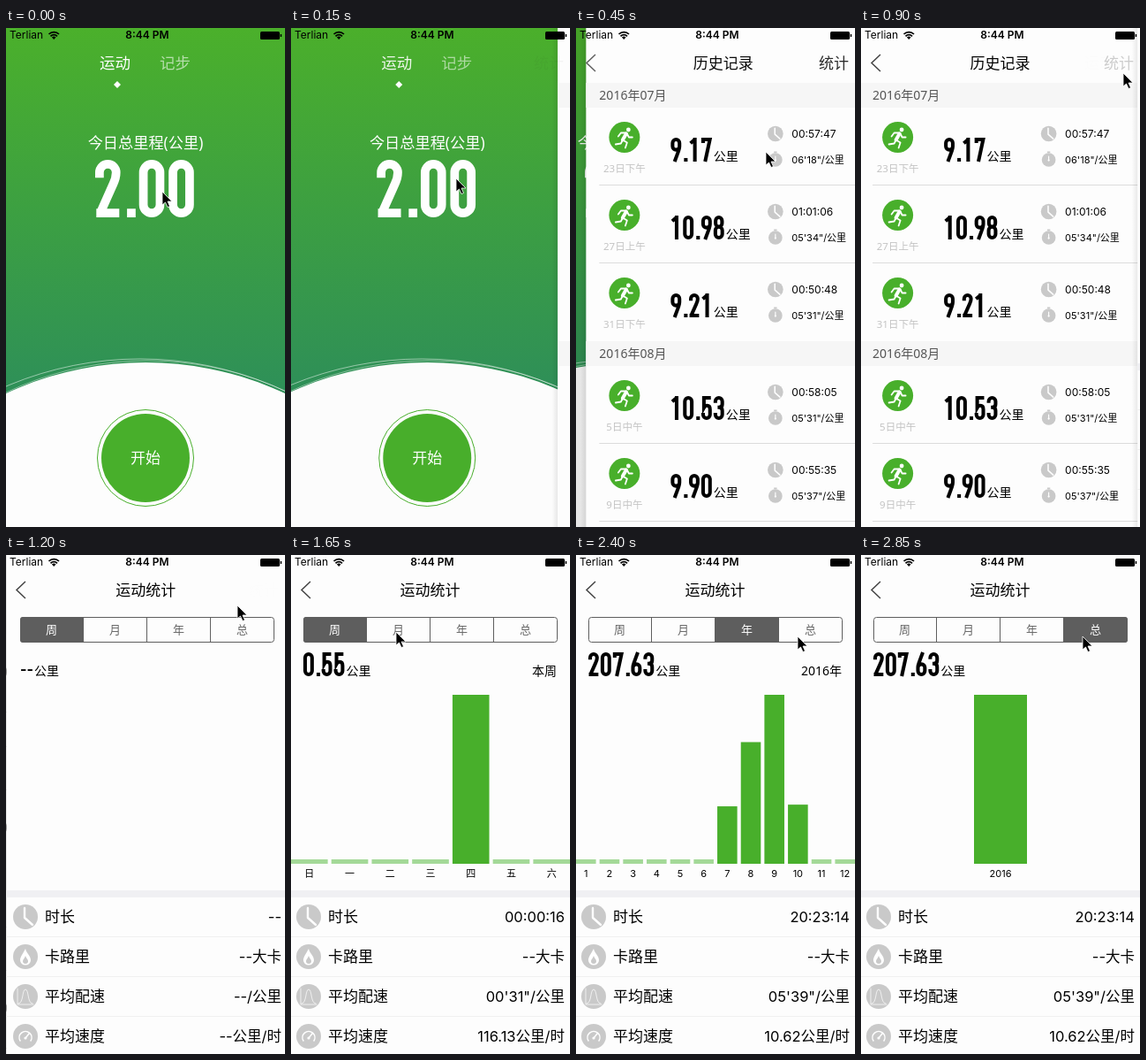
An HTML page for the animation above (3000 ms loop, 316 by 564 pixels).

```html
<!DOCTYPE html>
<html lang="zh-CN">
<head>
<meta charset="utf-8">
<title>运动</title>
<style>
html, body { margin: 0; width: 100%; height: 100%; overflow: hidden; background: #fdfdfd; }
svg { display: block; width: 316px; height: 564px; font-family: Inter, 'Noto Sans CJK SC', 'Noto Sans CJK', sans-serif; }
.cjk { font-family: 'Noto Sans', 'Noto Sans CJK SC', 'Noto Sans CJK', sans-serif; }
</style>
</head>
<body>
<svg id="stage" viewBox="0 0 316 564"></svg>
<script>
const W = 316, H = 564, LOOP = 3000, STEP = 150;
const GREEN = '#48af2b', PALE = '#a4d998', GREY = '#c9c9c9', PAPER = '#fdfdfd';

// Condensed numerals as strokes: 100 units tall, 44 wide
const GLYPHS = {
  0: 'M7.5 22a14.5 14.5 0 0 1 29 0V78a14.5 14.5 0 0 1-29 0Z',
  1: 'M6 23L24 8M24.5 0V100',
  2: 'M7.5 31V22a14.5 14.5 0 0 1 29 0Q36.5 32 31 43L10 90M2 92.5H42',
  3: 'M7.5 29V22a14.5 14.5 0 0 1 29 0V34Q36.5 47 22 47H17M22 47Q36.5 47 36.5 61V78a14.5 14.5 0 0 1-29 0V70',
  5: 'M40 7.5H11V49Q16 40 24 40Q36.5 40 36.5 56V78a14.5 14.5 0 0 1-29 0V70',
  6: 'M28 0L11 46Q7.5 56 7.5 64V78a14.5 14.5 0 0 0 29 0V64a14.5 14.5 0 0 0-29 0',
  7: 'M7.5 22V7.5H36L16 100',
  8: 'M8.5 22a13.5 14.5 0 0 1 27 0V32a13.5 14.5 0 0 1-27 0ZM7.5 62a14.5 14.5 0 0 1 29 0V78a14.5 14.5 0 0 1-29 0Z',
  9: 'M16 100L33 54Q36.5 44 36.5 36V22a14.5 14.5 0 0 0-29 0V36a14.5 14.5 0 0 0 29 0',
  '.': 'M4 92.5H19'
};

const text = (x, y, size, str, attrs = '') => `<text x="${x}" y="${y}" font-size="${size}" ${attrs}>${str}</text>`;
const rect = (x, y, w, h, fill, attrs = '') => `<rect x="${x}" y="${y}" width="${w}" height="${h}" fill="${fill}" ${attrs}/>`;
const circle = (x, y, r, attrs) => `<circle cx="${x}" cy="${y}" r="${r}" ${attrs}/>`;
const line = (d, color, width, attrs = '') => `<path d="${d}" fill="none" stroke="${color}" stroke-width="${width}" ${attrs}/>`;
const group = (x, y, body, scale = 1) => `<g transform="translate(${x} ${y}) scale(${scale})">${body}</g>`;
const MID = 'text-anchor="middle"', END = 'text-anchor="end"', CJK = 'class="cjk"', ROUND = 'stroke-linecap="round" stroke-linejoin="round"';

const advance = c => c === '.' ? 25 : 51.5;
const numeralWidth = (str, height) => [...str].reduce((sum, c) => sum + advance(c), 0) * height / 100;
function numerals(x, y, height, str, color) {
  let pen = 0, body = '';
  for (const c of str) {
    body += `<path transform="translate(${pen})" d="${GLYPHS[c]}"/>`;
    pen += advance(c);
  }
  return `<g role="img" aria-label="${str}" fill="none" stroke="${color}" stroke-width="15" transform="translate(${x} ${y}) scale(${height / 100})">${body}</g>`;
}
const distance = (x, y, str) => numerals(x, y, 27, str, '#000') + text(x + numeralWidth(str, 27), y + 26, 14, '公里');

// Icons, each on a disc of radius 14
const disc = circle(0, 0, 14, `fill="${GREY}"`);
const white = (d, width) => line(d, '#fff', width, ROUND);
const clock = disc + white('M-1-10V1L8 9', 2.4);
const flame = disc + '<path d="M0-9C1-4 6-1 6 4A6 5.5 0 0 1-6 4C-6 0-3-3 0-9Z" fill="#fff"/>' +
  `<path d="M0-1C1 2 3 3 3 5A3 3 0 0 1-3 5C-3 3-1 2 0-1Z" fill="${GREY}"/>`;
const curve = disc + white('M-9-9V9H9M-8 8C-2 8-4-8 0-8S2 8 8 8', .7);
const gauge = disc + white('M-6 5A7 7 0 1 1 6 5M0 2L4-3', 1.5) + circle(0, 2, 1.6, 'fill="#fff"');
const stopwatch = disc + rect(-3, -17, 6, 3, GREY) + white('M0 1V-7', 2) + circle(0, 1, 2, 'fill="#fff"');
const runner = circle(0, 0, 17.5, `fill="${GREEN}"`) + circle(4.5, -8.5, 2.4, 'fill="#fff"') +
  white('M2-4L-2 3', 4) + white('M2-5L-4-5L-7-1M3-4L5 0L9 0M-2 3L3 6L1 12M-2 3L-4 7L-10 8', 1.8);

const home = tabOpacity =>
  rect(0, 0, W, H, 'url(#sky)') +
  `<g opacity="${tabOpacity}">` + text(123.5, 46, 17.5, '运动', MID + ' fill="#fff"') +
  text(191.5, 46, 17.5, '记步', MID + ' fill="#fff" fill-opacity=".6"') + '</g>' +
  '<path d="M126 60l4 4-4 4-4-4Z" fill="#fff"/>' +
  text(158, 136, 17.2, '今日总里程(公里)', MID + ' class="cjk" fill="#fff"') +
  numerals(101, 149, 65, '2.00', '#fff') +
  circle(152, 762, 388, 'fill="none" stroke="#fff" stroke-opacity=".5"') +
  circle(160, 750, 374, 'fill="none" stroke="#fff" stroke-opacity=".4"') +
  circle(158, 752, 374, `fill="${PAPER}"`) +
  circle(158, 486, 54.5, `fill="none" stroke="${GREEN}"`) + circle(158, 486, 50, `fill="${GREEN}"`) +
  text(158, 492, 17, '开始', MID + ' fill="#fff"');

// Sheets reach slightly past their left edge
const sheet = (y, height, fill) => rect(-1.5, y, W + 3, height, fill);

const runs = [
  [90, '23日下午', '9.17', '00:57:47', `06'18"`],
  [178, '27日上午', '10.98', '01:01:06', `05'34"`],
  [266, '31日下午', '9.21', '00:50:48', `05'31"`],
  [382, '5日中午', '10.53', '00:58:05', `05'31"`],
  [470, '9日中午', '9.90', '00:55:35', `05'37"`]
];
const month = (y, name) => sheet(y, 28, '#f6f6f6') + text(13.5, y + 19, 14, name, CJK + ' fill="#555"');
const run = ([y, day, km, time, pace]) =>
  group(42, y + 33.5, runner) +
  text(42, y + 73, 11.5, day, MID + ' class="cjk" fill="#c4c4c4"') +
  distance(94.5, y + 34, km) +
  group(213, y + 29.5, clock, .63) + group(213, y + 59, stopwatch, .56) +
  text(231.5, y + 34, 12, time) + text(231.5, y + 63, 11, pace + '/公里') +
  (y === 266 ? '' : rect(13.5, y + 87, W, 1, '#dcdcdc'));
const history = sheet(0, H, PAPER) + month(62, '2016年07月') + month(354, '2016年08月') + runs.map(run).join('');

const sparse = (count, values) => Array.from({ length: count }, (_, i) => values[i + 1] || 0);
const yearTotals = ['20:23:14', '--大卡', `05'39"/公里`, '10.62公里/时'];
const views = [
  { from: 1300, km: '0.55', period: '本周', bars: sparse(7, { 5: 1 }), label: i => '日一二三四五六'[i],
    totals: ['00:00:16', '--大卡', `00'31"/公里`, '116.13公里/时'] },
  { from: 1740, km: '30.08', period: '2016年10月', bars: sparse(31, { 4: .99, 9: .98, 13: 1, 27: .08 }),
    label: i => i && (i + 1) % 5 ? '·' : i + 1,
    totals: ['03:06:39', '--大卡', `04'51"/公里`, '12.37公里/时'] },
  { from: 2110, km: '207.63', period: '2016年', bars: sparse(12, { 7: .34, 8: .72, 9: 1, 10: .35 }), label: i => i + 1, totals: yearTotals },
  { from: 2600, km: '207.63', period: '', bars: [1], label: () => '2016', totals: yearTotals }
];

function chart({ bars, label, from }, t) {
  const pitch = (W + 4.1) / bars.length, width = Math.min(60, pitch - 4.1);
  const grown = 1 - (1 - Math.min(1, (t - from) / 140)) ** 2;
  return bars.map((value, i) => {
    const mid = i * pitch + (pitch - 4.1) / 2, height = value ? 191 * value * grown : 5;
    return rect(mid - width / 2, 349 - height, width, height, value ? GREEN : PALE) + text(mid, 364, 11, label(i), MID);
  }).join('');
}

function segments(selected, pressed) {
  let body = '';
  [...'周月年总'].forEach((name, i) => {
    const x = 13.5 + i * 72, on = i === selected;
    if (on || i === pressed) body += rect(x, 70, 72.5, 29, '#5e5e5e', `fill-opacity="${on ? 1 : .25}"`);
    if (i) body += line(`M${x} 70V99`, '#5e5e5e', 1);
    body += text(x + 36, 89, 13, name, `${MID} fill="${on ? '#fff' : '#666'}"`);
  });
  return `<g clip-path="url(#pill)">${body}</g>` + rect(14.5, 70.5, 287, 28, 'none', 'rx="3" stroke="#5e5e5e"');
}

function stats(t) {
  const view = views.findLast(v => t >= v.from);
  const totals = view ? view.totals : ['--', '--大卡', '--/公里', '--公里/时'];
  const rows = [['时长', clock], ['卡路里', flame], ['平均配速', curve], ['平均速度', gauge]];
  return sheet(0, H, PAPER) +
    segments(view ? views.indexOf(view) : 0, t >= 2550 ? 3 : -1) +
    (view
      ? distance(14, 110, view.km) + text(301, 136, 14, view.period, END + ' class="cjk"') + chart(view, t)
      : text(14, 135, 16, '--', 'font-weight="700"') + text(30, 136, 14, '公里')) +
    sheet(379, 8, '#f0f0f3') +
    rows.map(([name, icon], i) => {
      const y = 409 + i * 45;
      return group(20, y, icon) + text(42, y + 6, 17, name) + text(310, y + 6, 16.5, totals[i], END) +
        (i < 3 ? sheet(y + 22, 1, '#f0f0f0') : '');
    }).join('');
}

const statusBar =
  text(4, 12, 12, 'Terlian') + text(160, 12, 12, '8:44 PM', MID + ' font-weight="600"') +
  line('M48.5 7A8 8 0 0 1 60 7M50.5 9.3A5.2 5.2 0 0 1 58 9.3', '#000', 1.7) + '<path d="M54.2 13l-2.3-2.4a3.3 3.3 0 0 1 4.6 0Z"/>' +
  rect(288, 4, 22, 9, '#000', 'rx="1.5"') + rect(310.7, 7, 1.5, 3, '#000');

// Critically damped spring from 0 to 1; rate is per millisecond
function spring(t, start, rate) {
  const x = Math.max(0, t - start) * rate;
  return 1 - (1 + x) * Math.exp(-x);
}

const pointerPath = [
  [0, 177, 185], [150, 187, 170], [300, 188, 164], [450, 215, 140], [600, 280, 90], [750, 296, 55], [900, 297, 51],
  [1200, 262, 57], [1350, 218, 70], [1500, 106, 76], [1650, 119, 87], [1800, 135, 90], [1950, 186, 91],
  [2100, 198, 92], [2250, 213, 93], [2400, 251, 92], [LOOP, 251, 92]
];
function pointer(t) {
  const i = pointerPath.findIndex(p => p[0] > t);
  const [t0, x0, y0] = pointerPath[i - 1], [t1, x1, y1] = pointerPath[i], k = (t - t0) / (t1 - t0);
  return group(x0 + (x1 - x0) * k, y0 + (y1 - y0) * k,
    '<path d="M0 0V15L3.5 12L6 17.5L8.5 16.5L6 11H11Z" stroke="#fff" stroke-width=".8"/>');
}

// Lower page drifts left and dims while the upper page slides in
function push(lower, upper, p) {
  if (p <= 0) return lower;
  return group(-.3 * W * p, 0, lower) + rect(0, 0, W, H, '#000', `opacity="${.09 * p}"`) +
    group(W * (1 - p), 0, rect(-8, 0, 8, H, 'url(#shadow)') + upper);
}

function navBar(p, q, t) {
  const title = (x, name, opacity) => text(x, 46, 17, name, `${MID} opacity="${opacity}"`);
  return line('M22 30L12 39.5L22 49', '#444', 1.5, `opacity="${p ** 4}"`) +
    title(158 + 218 * (1 - p) - 100 * q, '历史记录', p * (1 - q) ** 2) +
    title(157.5 + 130 * (1 - q), '运动统计', q) +
    text(275, 46, 17, '统计', `fill="${t < 900 ? '#222' : '#ccc'}" opacity="${p * (1 - q)}"`);
}

const defs = `<defs>
  <linearGradient id="sky" x2="0" y2="410" gradientUnits="userSpaceOnUse"><stop stop-color="#4bb02b"/><stop offset="1" stop-color="#2e9058"/></linearGradient>
  <linearGradient id="shadow"><stop stop-opacity="0"/><stop offset="1" stop-opacity=".1"/></linearGradient>
  <clipPath id="pill"><rect x="14" y="70" width="288" height="29" rx="3"/></clipPath>
</defs>`;

function scene(t) {
  const p = spring(t, 130, .0156), q = spring(t, 896, .0235);
  const pages = q > 0 ? push(history, stats(t), q) : push(home(Math.max(0, 1 - p * 2)), history, p);
  return defs + pages + navBar(p, q, t) + statusBar + pointer(t);
}

const stage = document.getElementById('stage');
let shown = -1;
function tick() {
  // The picture advances in steps of STEP ms
  const t = Math.floor(performance.now() % LOOP / STEP) * STEP;
  if (t !== shown) stage.innerHTML = scene(shown = t);
  requestAnimationFrame(tick);
}
tick();
</script>
</body>
</html>
```
